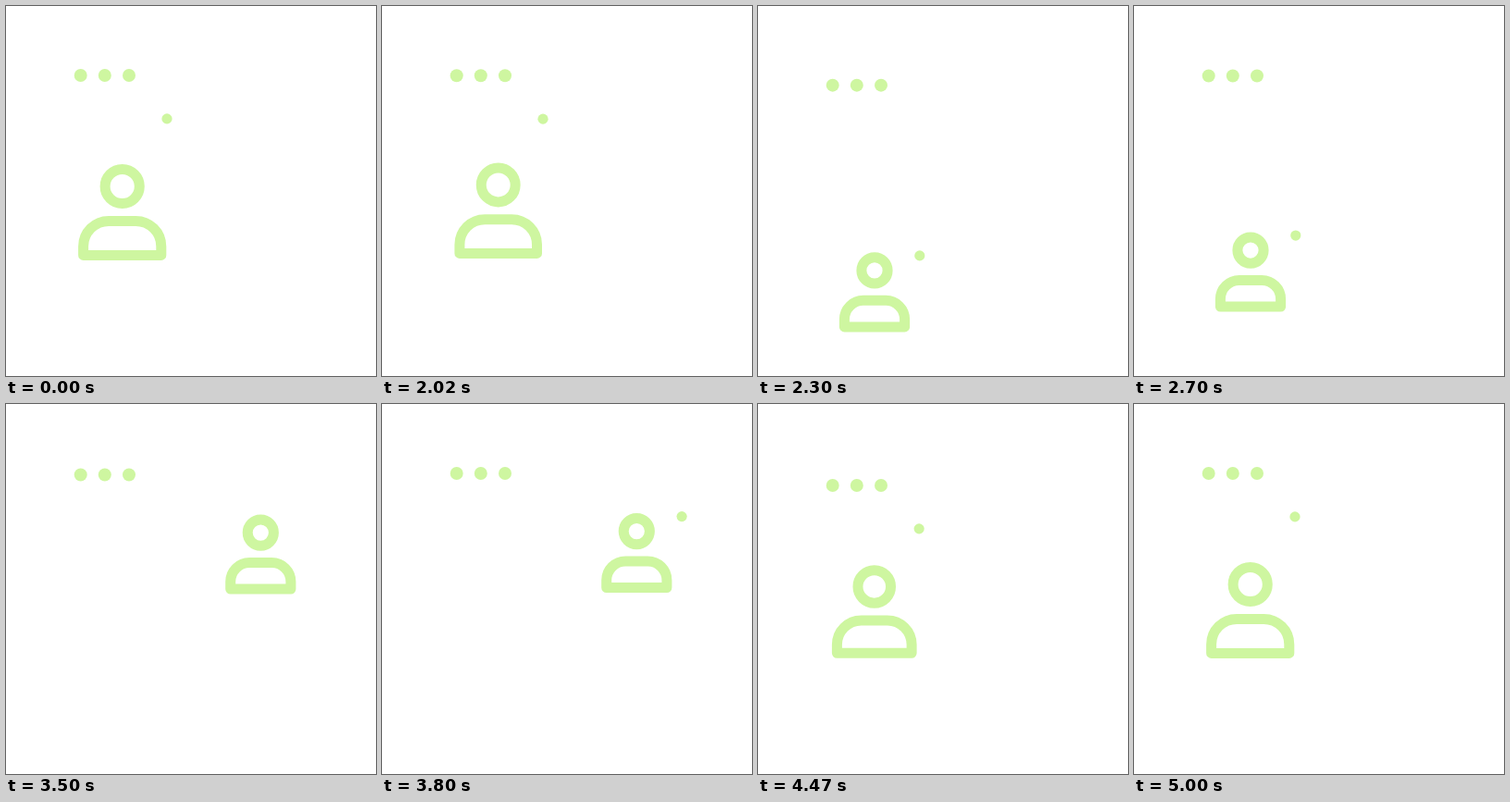
These frames come from a looping animation (400x400 px, 5.02 s). An HTML page:

```html
<!DOCTYPE html>
<html lang="en">
<head>
<meta charset="utf-8">
<title>Call layout</title>
<style>
  html, body { margin: 0; width: 100%; height: 100%; overflow: hidden; background: #fff; }
  svg { display: block; width: 100%; height: 100%; }
  .fill { fill: #cef6a0; }
  .line { fill: none; stroke: #cef6a0; stroke-width: 11; stroke-linejoin: round; }
</style>
</head>
<body>
<svg viewBox="0 0 400 400">
  <g id="bar" class="fill">
    <circle cx="80.7" cy="75" r="7"/>
    <circle cx="106.8" cy="75" r="7"/>
    <circle cx="133" cy="75" r="7"/>
  </g>
  <g id="tile">
    <circle id="head" class="line"/>
    <path id="body" class="line"/>
    <circle id="mic" class="fill" r="5.6"/>
  </g>
</svg>
<script>
const LOOP = 5020;
const SHRINK = 2000, TO_LOWER = 2260, TO_RIGHT = 3350, GROW = 4250;
const [bar, tile, head, body, mic] =
  ['bar', 'tile', 'head', 'body', 'mic'].map(id => document.getElementById(id));

const clamp = v => Math.min(1, Math.max(0, v));
const mix = (a, b, k) => a + (b - a) * k;
const within = (t, a, b) => t >= a && t < b;
const set = (el, attrs) => { for (const k in attrs) el.setAttribute(k, attrs[k]); };

// cubic-bezier(.25, .1, .25, 1)
function ease(x) {
  if (x <= 0 || x >= 1) return clamp(x);
  const curve = (a, b, s) => 3 * a * s * (1 - s) ** 2 + 3 * b * s * s * (1 - s) + s ** 3;
  let lo = 0, hi = 1;
  for (let i = 0; i < 24; i++) {
    const mid = (lo + hi) / 2;
    if (curve(.25, .25, mid) < x) lo = mid; else hi = mid;
  }
  return curve(.1, 1, lo);
}

// One smooth dip that starts and ends at rest
const dip = (t, from, to, size) => size * Math.sin(Math.PI * clamp((t - from) / (to - from))) ** 2;

const sway = t =>
  dip(t, SHRINK, 2470, 13) + dip(t, 2470, 2755, 1.4) +
  dip(t, TO_RIGHT, 3800, 2) +
  dip(t, GROW, 4690, 13) + dip(t, 4690, 5005, 1.6);

// k = 0: small tile, k = 1: full view
function drawPerson(k) {
  const cx = mix(126, 125.7, k), half = mix(32.6, 42.1, k), r = mix(20.5, 27.5, k);
  const top = mix(170, 232.4, k), bottom = mix(198.6, 269.4, k);
  set(head, { cx, cy: mix(137.6, 195, k), r: mix(14.1, 18.6, k) });
  set(body, {
    d: `M${cx - half} ${bottom}V${top + r}a${r} ${r} 0 0 1 ${r} ${-r}` +
       `H${cx + half - r}a${r} ${r} 0 0 1 ${r} ${r}V${bottom}Z`
  });
  set(mic, { cx: mix(174.8, 174, k), cy: mix(121.6, 121.9, k) });
}

function draw(t) {
  const dy = sway(t);
  let k = 1, x = 0, y = 0;
  if (within(t, SHRINK, TO_LOWER)) {
    k = 1 - ease((t - SHRINK) / 430);
  } else if (within(t, TO_LOWER, TO_RIGHT)) {
    k = 0;
    y = 126 + 57 * (1 - clamp((t - SHRINK) / 550)) ** 2;
  } else if (within(t, TO_RIGHT, GROW)) {
    k = 0;
    x = 149.3;
  } else if (t >= GROW) {
    k = ease((t - GROW) / 430);
  }
  const muted = within(t, 2950, 3100) || within(t, TO_RIGHT, 3550) ||
                within(t, 3920, 4100) || within(t, GROW, 4350);
  drawPerson(k);
  set(bar, { transform: `translate(0 ${dy})` });
  set(tile, { transform: `translate(${x} ${y + dy})` });
  set(mic, { visibility: muted ? 'hidden' : 'visible' });
}

const start = performance.now();
function tick() {
  draw((performance.now() - start) % LOOP);
  requestAnimationFrame(tick);
}
draw(0);
requestAnimationFrame(tick);
</script>
</body>
</html>
```
